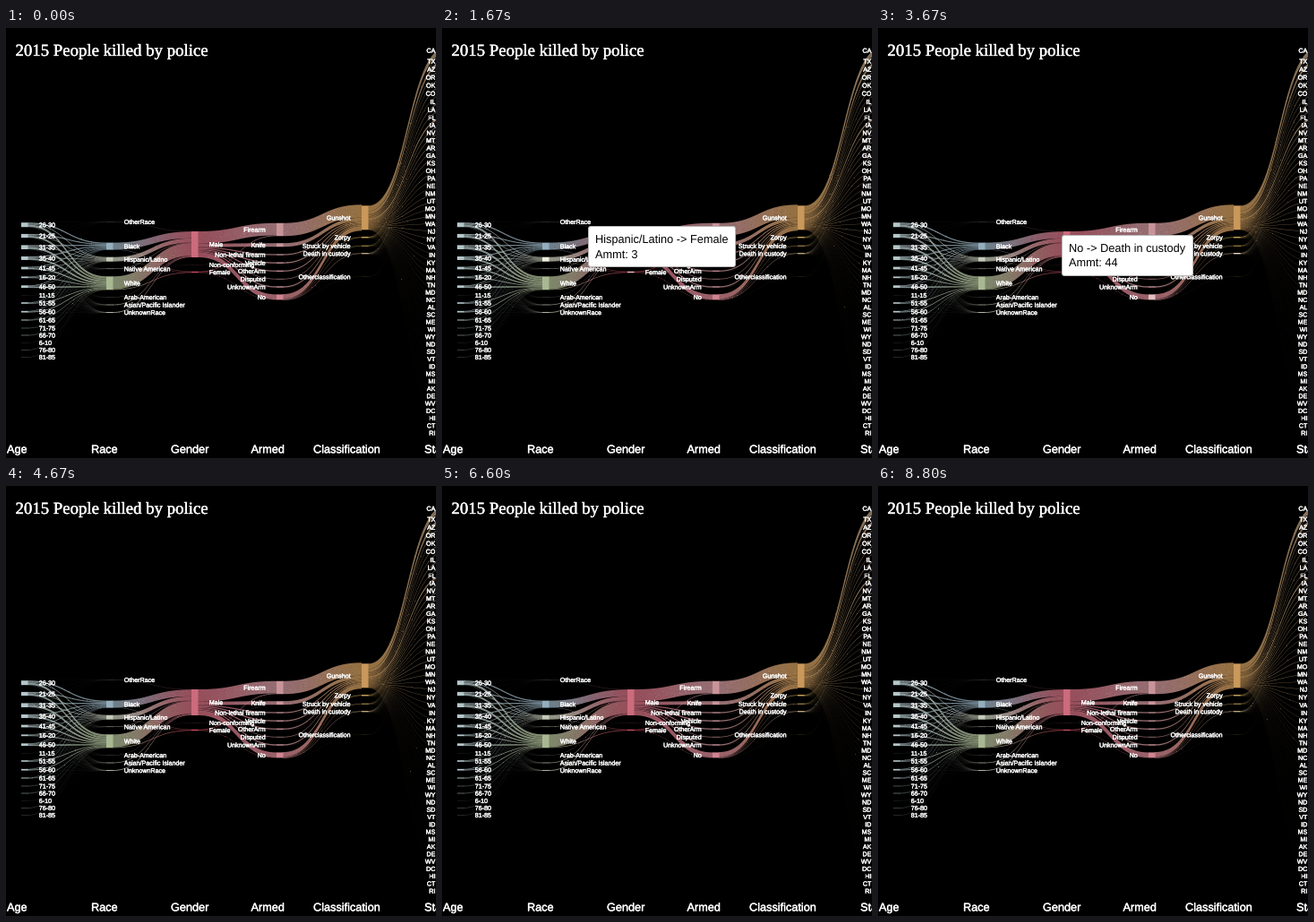
Recreate the animation shown at these times as a matplotlib script. Size 480x480 px, loop 8870 ms.

```python
import numpy as np
import matplotlib.pyplot as plt
from matplotlib import patheffects
from matplotlib.animation import FuncAnimation
from matplotlib.colors import to_rgb
from matplotlib.patches import FancyBboxPatch, Rectangle

plt.rcParams["text.hinting"] = "no_hinting"
SIZE, FRAMES, LOOP_MS = 480, 133, 8870
PX = 0.72  # points per pixel at 100 dpi
NODE_W = 7.5
rng = np.random.default_rng(15)

AGE, BLUE, SAGE, GREEN = "#b4c6ca", "#94aebd", "#c3c9b7", "#a9b892"
PINK, RED, ROSE, ORANGE = "#cb6b7c", "#c64a5c", "#c8949a", "#c9985a"
YELLOW, SAND = "#c4a258", "#ab957c"

# Each column: left edge, label side, nodes as (name, centre y, height, colour)
COLUMNS = [
    (17, "left", [
        ("26-30", 219.7, 5, AGE), ("21-25", 232, 4.2, AGE), ("31-35", 244.7, 4.6, AGE),
        ("36-40", 257, 4, AGE), ("41-45", 268, 2.8, AGE), ("16-20", 278.3, 1.8, AGE),
        ("46-50", 288.7, 2.8, AGE), ("11-15", 298.3, .1, AGE), ("51-55", 307, 1.6, AGE),
        ("56-60", 316.7, 1.7, AGE), ("61-65", 326, 1, AGE), ("71-75", 335, .4, AGE),
        ("66-70", 343, .5, AGE), ("6-10", 351.3, .1, AGE), ("76-80", 359.3, .3, AGE),
        ("81-85", 367.3, .2, AGE)]),
    (112, "left", [
        ("OtherRace", 216.3, .2, SAGE), ("Black", 243.6, 8, BLUE),
        ("Hispanic/Latino", 258.2, 5, SAGE), ("Native American", 268.8, .5, SAGE),
        ("White", 284.8, 15, GREEN), ("Arab-American", 300.5, .2, SAGE),
        ("Asian/Pacific Islander", 309, .7, SAGE), ("UnknownRace", 317.5, .9, SAGE)]),
    (207, "left", [
        ("Male", 241.5, 29, PINK), ("Non-conforming", 264.3, .15, PINK),
        ("Female", 272.5, 1.5, RED)]),
    (302, "right", [
        ("Firearm", 225, 14.5, ROSE), ("Knife", 242.2, 4, ROSE),
        ("Non-lethal firearm", 253, 1.3, ROSE), ("Vehicle", 262.2, 1.4, ROSE),
        ("OtherArm", 271.3, 1.3, ROSE), ("Disputed", 280.2, .7, ROSE),
        ("UnknownArm", 289, 1.4, ROSE), ("No", 300.4, 6, "#d08490")]),
    (397, "right", [
        ("Gunshot", 211.8, 27, ORANGE), ("Zorpy", 233.7, 1.5, YELLOW),
        ("Struck by vehicle", 243.2, 1, YELLOW), ("Death in custody", 251.7, 1.3, "#c9b088"),
        ("Otherclassification", 277.7, .15, YELLOW)]),
]
STATES = ("CA TX AZ OR OK CO IL LA FL IA NV MT AR GA KS OH PA NE NM UT MO MN WA NJ NY VA "
          "IN KY MA NH TN MD NC AL SC ME WI WY ND SD VT ID MS MI AK DE WV DC HI CT RI").split()
order = np.arange(len(STATES))
state_y = np.interp(order, [0, 1, 8, 23, 27, 50], [25, 37, 100, 227, 262, 452])
state_h = np.exp(-order / 17) * rng.uniform(.45, 1, len(order))
state_h[[0, 1, 8]] = 4, 2.2, 1.4
state_h *= 30 / state_h.sum()
COLUMNS.append((491.5, "right",
                [(s, y, h, SAND) for s, y, h in zip(STATES, state_y, state_h)]))

HEADINGS = [(1, "Age"), (95, "Race"), (184, "Gender"), (273.5, "Armed"),
            (343, "Classification"), (467, "State")]

# start ms, end ms, left, top, width, lines, highlighted nodes
TIPS = [
    (1000, 2150, 163, 221, 165, ("Hispanic/Latino -> Female", "Ammt: 3"),
     {"Hispanic/Latino": "#f0eedf", "Female": "#e8b9bd"}),
    (2930, 4150, 205, 231, 147, ("No -> Death in custody", "Ammt: 44"),
     {"No": "#e3bfc2", "Death in custody": "#f0e8da"}),
    (4800, 5900, 68, 217, 101, ("31-35 -> White", "Ammt: 86"),
     {"31-35": "#f2f2f2", "White": "#dedccd"}),
]


def ease_x(t):
    return 1.5 * t - 1.5 * t**2 + t**3


def ease_y(t):
    return 3 * t**2 - 2 * t**3


def make_links():
    """Rows of x0, x1, y0, y1, width, start colour, end colour."""
    rows = []
    for (xa, _, left), (xb, _, right) in zip(COLUMNS, COLUMNS[1:]):
        ha = np.array([n[2] for n in left])
        hb = np.array([n[2] for n in right])
        flow = np.outer(ha, hb) / hb.sum()
        if left[0][0] == "Firearm":
            flow[:2] = 0
            flow[:2, 0] = ha[:2]
            flow[7, 1:] *= 2
        out = np.cumsum(flow, 1) - flow / 2 - flow.sum(1, keepdims=True) / 2
        into = np.cumsum(flow, 0) - flow / 2 - flow.sum(0) / 2
        for i, j in np.argwhere(flow > .004):
            rows.append(np.r_[xa + NODE_W, xb, left[i][1] + out[i, j],
                              right[j][1] + into[i, j], flow[i, j],
                              to_rgb(left[i][3]), to_rgb(right[j][3])])
    return np.array(rows)


def paint_links(links, sub=4):
    """Blend bands of constant vertical thickness, averaging sub samples per pixel."""
    image = np.zeros((SIZE, SIZE, 3))
    ys = np.arange(SIZE)[:, None]
    t = np.linspace(0, 1, 200)
    for x0, x1, y0, y1, width, *colors in links:
        cols = np.arange(int(x0), min(int(np.ceil(x1)), SIZE))
        xs = (cols[:, None] + (np.arange(sub) + .5) / sub).ravel()
        u = np.interp((xs - x0) / (x1 - x0), ease_x(t), t)
        y = y0 + (y1 - y0) * ease_y(u)
        low, high = y - width / 2, y + width / 2
        cover = np.clip(np.minimum(ys + 1, high) - np.maximum(ys, low), 0, 1)
        alpha = cover.reshape(SIZE, -1, sub).mean(2)[..., None] * .74
        mix = u.reshape(-1, sub).mean(1)[:, None]
        shade = (1 - mix) * colors[:3] + mix * colors[3:]
        image[:, cols] = image[:, cols] * (1 - alpha) + shade * alpha
    return image


fig = plt.figure(figsize=(4.8, 4.8), dpi=100, facecolor="black")
ax = fig.add_axes([0, 0, 1, 1])
links = make_links()
ax.imshow(paint_links(links), extent=(0, SIZE, SIZE, 0), interpolation="nearest")
ax.set(xlim=(0, SIZE), ylim=(SIZE, 0), aspect="auto")
ax.axis("off")


def label(x, y, text, px, color="white", font="Liberation Sans", weight=.35, **kw):
    bolder = [patheffects.withStroke(linewidth=weight * PX, foreground=color)]
    return ax.text(x, y, text, fontsize=px * PX, color=color, family=font,
                   va="baseline", path_effects=bolder if weight else None, **kw)


# Particles drifting inside the bands
COUNT = 800
share = np.where(links[:, 4] > .12, links[:, 4], 0)
pick = rng.choice(len(links), COUNT, p=share / share.sum())
lane = rng.uniform(-.45, .45, COUNT) * links[pick, 4]
phase = rng.random(COUNT)
laps = rng.integers(4, 10, COUNT)
glow = rng.uniform(.5, 1, (COUNT, 1))
dots = ax.scatter(np.zeros(COUNT), np.zeros(COUNT), s=PX**2, marker="s",
                  linewidths=0, alpha=.5, zorder=2)

boxes = {}
for x, side, nodes in COLUMNS:
    for name, y, h, color in nodes:
        box = Rectangle((x, y - h / 2), NODE_W, h, fc=color, lw=0, zorder=3, snap=False)
        boxes[name] = ax.add_patch(box), color
        at = x + NODE_W + 12.3 if side == "left" else x - 12.2
        label(at, y + 2.6, name, 7.1, ha=side, zorder=4)

for x, text in HEADINGS:
    label(x, 474.4, text, 12.7, zorder=4)
label(10.5, 31, "2015 People killed by police", 18.8, font="Liberation Serif", zorder=4)

tips = []
for start, end, x, y, w, lines, marks in TIPS:
    parts = [ax.add_patch(FancyBboxPatch(
        (x + .5, y + .5), w - 1, 45, boxstyle="round,pad=0,rounding_size=2.5",
        fc="white", ec="#b8b8b8", lw=PX, zorder=5))]
    parts += [label(x + 8, y + 19 + 17 * k, line, 12.8, "black", weight=0, zorder=6)
              for k, line in enumerate(lines)]
    tips.append((start, end, parts, marks))


def update(frame):
    now = frame * LOOP_MS / FRAMES
    t = (phase + laps * frame / FRAMES) % 1
    x0, x1, y0, y1 = links[pick, :4].T
    dots.set_offsets(np.c_[x0 + (x1 - x0) * ease_x(t),
                           y0 + (y1 - y0) * ease_y(t) + lane])
    mix = t[:, None]
    shade = links[pick, 5:8] * (1 - mix) + links[pick, 8:] * mix
    dots.set_facecolor(shade * glow)
    for box, color in boxes.values():
        box.set_facecolor(color)
    for start, end, parts, marks in tips:
        shown = start <= now < end
        for part in parts:
            part.set_visible(shown)
        if shown:
            for name, color in marks.items():
                boxes[name][0].set_facecolor(color)
    return [dots]


anim = FuncAnimation(fig, update, frames=FRAMES, interval=LOOP_MS / FRAMES,
                     repeat=True, repeat_delay=0, blit=False)
plt.show()
```
